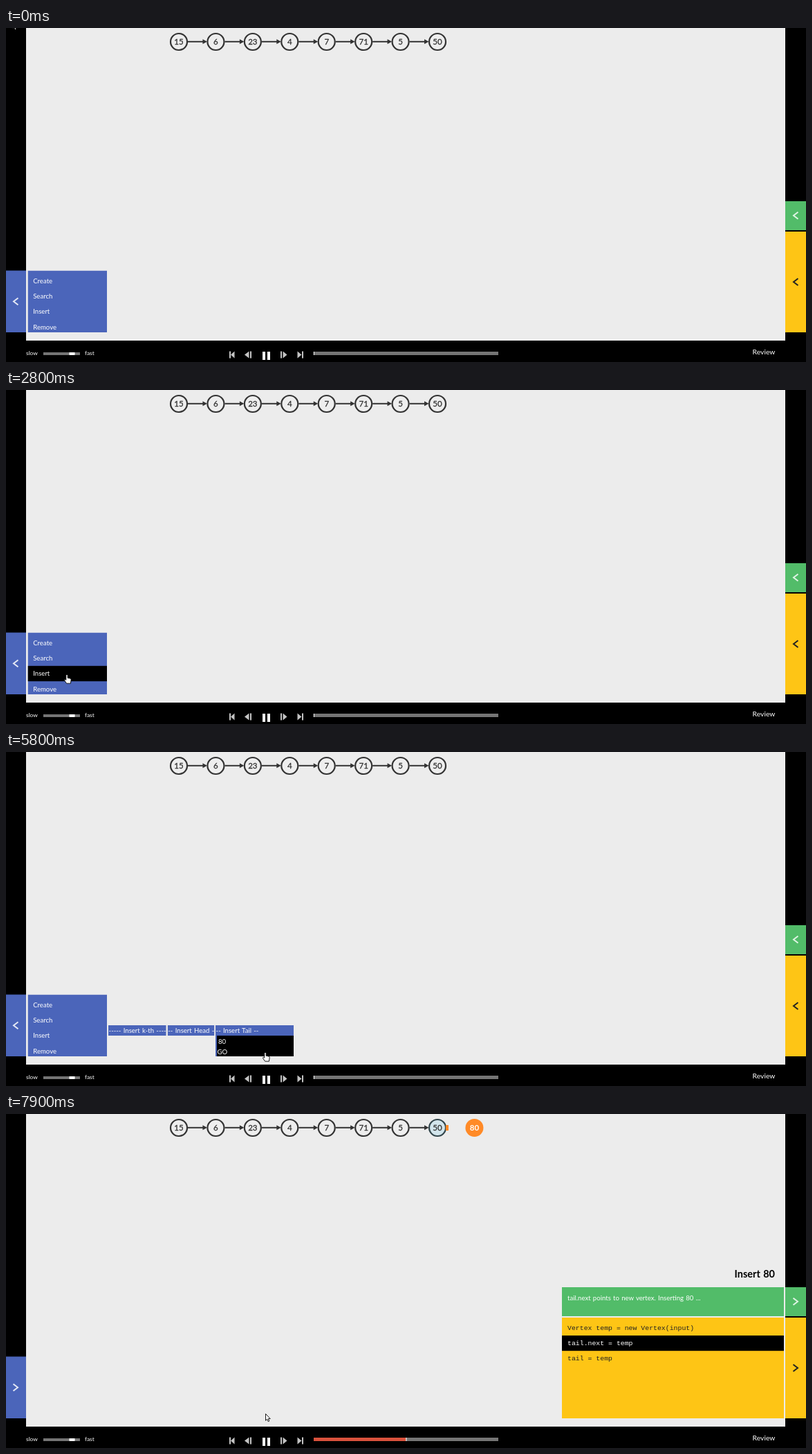
These frames come from a looping animation (1157x484 px, 8000 ms). An HTML page:

```html
<!DOCTYPE html>
<html lang="en">
<head>
<meta charset="utf-8">
<title>Linked list insertion</title>
<style>
  html, body { margin: 0; width: 100%; height: 100%; overflow: hidden; background: #000; }
  #stage { display: block; width: 1157px; height: 484px; }
  text { font: 9.6px Lato, "Open Sans", sans-serif; word-spacing: .8px; fill: #fff; }
  .code { font: 9.85px "Liberation Mono", monospace; word-spacing: 0; fill: #222; }
  .code.on { fill: #fff; }
  .small { font-size: 8.4px; }
  .review { font-size: 10.4px; }
  .title { font-size: 14.5px; font-weight: 700; fill: #000; }
  .node text { font-size: 11.5px; fill: #333; stroke: #333; stroke-width: .3; text-anchor: middle; }
  .node circle { fill: #eee; stroke: #333; stroke-width: 2.2; }
  .node.visited circle { fill: #d2e5ec; stroke: #33464c; }
  .node.fresh circle { fill: #ff8a27; stroke: none; }
  .node.fresh text { font-weight: 700; fill: #fff; stroke: none; }
  .chevron { fill: none; stroke-width: 2; }
  .blue { fill: #4b65ba; }
  .green { fill: #52bc69; }
  .gold { fill: #fec515; }
  .hover { fill: #000; }
  .bar { fill: #757575; }
  #cursor path { fill: #fff; stroke: #000; stroke-width: .9; stroke-linejoin: round; }
</style>
</head>
<body>
<svg id="stage" viewBox="0 0 1157 484">
  <rect width="1157" height="484"/>
  <rect x="29" width="1098" height="453" fill="#ececec"/>

  <g id="list"></g>
  <rect id="link" x="636" y="16" width="4" height="8" fill="#ff8a27"/>
  <g id="fresh" class="node fresh"><circle r="13"/><text y="4.1">80</text></g>

  <rect class="blue" y="351.5" width="29" height="89.5"/>
  <rect class="green" x="1127" y="251" width="30" height="42"/>
  <rect class="gold" x="1127" y="295" width="30" height="146"/>
  <g id="chevrons"></g>

  <svg id="menu" x="31.5" y="351.5" height="89.5">
    <rect class="blue" width="114.5" height="89.5"/>
    <rect id="menuHover" width="114.5"/>
  </svg>

  <g id="submenu">
    <g id="tabs"></g>
    <g id="form">
      <rect class="blue" x="303" y="411" width="113" height="30"/>
      <g id="fields">
        <rect x="305" y="411" width="111" height="16"/>
        <rect id="go" x="305" y="427" width="111" height="14"/>
        <text x="307" y="422.6">80</text>
        <text x="305.5" y="437.6">GO</text>
      </g>
    </g>
  </g>

  <text id="title" class="title" x="1112" y="237" text-anchor="end">Insert 80</text>
  <svg id="status" y="251" height="42">
    <rect class="green" width="321" height="42"/>
    <text id="message" x="8" y="18.7"></text>
  </svg>
  <svg id="trace" y="295" height="146">
    <rect class="gold" width="321" height="146"/>
    <rect id="band" width="321" height="22.2"/>
  </svg>

  <text class="small" x="29" y="474.3">slow</text>
  <text class="small" x="114" y="474.3">fast</text>
  <rect class="bar" x="54" y="470" width="53" height="4"/>
  <rect x="91.5" y="470" width="8" height="4" fill="#fff"/>
  <path fill="#c4c4c4" d="M323 468.5h2v10h-2zM330.5 468.5v10l-5.5-5z
    M351.5 468.5v10l-6.5-5zM353 468.5h2v10h-2z
    M397 468.5h2v10h-2zM400.5 468.5v10l6-5z
    M421.5 468.5v10l6-5zM428 468.5h2v10h-2z"/>
  <path fill="#fff" d="M371 469h4v12h-4zM378 469h4v12h-4z"/>
  <rect class="bar" x="445" y="469" width="267" height="5"/>
  <rect id="done" x="445" y="469" height="5" fill="#d9513c"/>
  <rect id="knob" y="469" width="1.2" height="5" fill="#eee"/>
  <text class="review" x="1079.5" y="473.4">Review</text>

  <g id="cursor">
    <path id="arrow" d="M.5 .5V10.2L2.7 8.2 4.2 11.6 5.8 10.9 4.3 7.6H7.2Z"/>
    <path id="hand" d="M-1.2 8.2V1.3Q-1.2 .4 0 .4T1.2 1.3V5.2L5 6Q6.3 6.4 6.2 7.8L5.4 13.2H-.4L-3.4 8.8Q-3.6 7.2-2.4 7.4Z"/>
  </g>
</svg>

<script>
const LOOP = 8000, STEP = 100;
const OPEN = 3300, EXPAND = 4900, RUN = 6800, CREATE = 7200, LINK = 7900;
const $ = id => document.getElementById(id);

function add(parent, tag, attrs, text) {
  const node = document.createElementNS("http://www.w3.org/2000/svg", tag);
  set(node, attrs);
  if (text) node.textContent = text;
  return parent.appendChild(node);
}
function set(node, attrs) {
  for (const key in attrs) node.setAttribute(key, attrs[key]);
}
const show = (node, on) => set(node, { visibility: on ? "visible" : "hidden" });
const clamp = v => Math.max(0, Math.min(1, v));
const swing = v => 0.5 - Math.cos(Math.PI * clamp(v)) / 2;

// Linked list
const nodeX = i => 250 + i * 53.43;
const nodes = [15, 6, 23, 4, 7, 71, 5, 50].map((value, i) => {
  const x = nodeX(i);
  if (i) {
    add($("list"), "path", { d: `M${nodeX(i - 1) + 13} 19.8H${x - 16}`, stroke: "#333", "stroke-width": 2 });
    add($("list"), "path", { d: `M${x - 19} 16.3L${x - 12.5} 19.8L${x - 19} 23.3Z`, fill: "#333" });
  }
  const g = add($("list"), "g", { class: "node", transform: `translate(${x} 20)` });
  add(g, "circle", { r: 12 });
  add(g, "text", { y: 4.1 }, String(value));
  return g;
});

// Tab arrows
const chevrons = [[14, 396.3, "#e4e8f5"], [1142, 271.8, "#e0f4e4"], [1142, 368, "#222"]].map(([x, y, stroke]) => {
  const g = add($("chevrons"), "g", {});
  add(g, "path", { class: "chevron", d: "M3.5 -5L-3 0L3.5 5", stroke });
  return { g, x, y };
});

// Menus
const rowY = [0, 26, 48.3, 70.6];
["Create", "Search", "Insert", "Remove"].forEach((label, i) =>
  add($("menu"), "text", { x: 7.7, y: 18.3 + i * 22.3 }, label));

const tabs = [
  ["----- Insert k-th -----", 148, 83.5],
  ["-- Insert Head --", 233.7, 67.5],
  ["-- Insert Tail --", 303, 60]
].map(([label, x, width]) => {
  const box = add($("tabs"), "svg", { x, width, height: 15 });
  const back = add(box, "rect", { width: 113, height: 15 });
  add(box, "text", { x: .6, y: 11 }, label);
  return { box, back };
});

// Pseudocode
const code = ["Vertex temp = new Vertex(input)", "tail.next = temp", "tail = temp"].map((line, i) =>
  add($("trace"), "text", { x: 8, y: 17.8 + i * 22.3 }, line));
const messages = [
  "The current LinkedList",
  "Create new vertex to store value 80.",
  "tail.next points to new vertex. Inserting 80 ..."
];

// Pointer path: time, x, y
const path = [
  [0, 9, -9], [200, 9, -9], [400, 64, 152], [900, 64, 152], [1100, 81, 246],
  [1700, 81, 246], [1900, 92, 341], [2000, 92, 341], [2300, 86, 377.5],
  [2800, 88, 412], [3200, 88, 412], [3600, 216, 401], [3900, 272, 404],
  [4000, 272, 404], [4100, 301, 406], [4200, 301, 406], [4400, 325, 406.5],
  [5000, 325, 406.5], [5700, 375, 434], [5800, 375, 435], [6700, 375, 435],
  [6800, 375, 434], [8000, 375, 434]
];
const hovers = [
  [0, ""], [2100, "create"], [2400, "search"], [2600, "insert"], [3400, ""], [3800, "head"],
  [4100, ""], [4300, "tail"], [5200, ""], [5500, "go"], [RUN, ""]
];

function pointer(t) {
  const i = path.findIndex(p => p[0] > t);
  const [a, b] = [path[i - 1], path[i]];
  const k = (t - a[0]) / (b[0] - a[0]);
  return [a[1] + (b[1] - a[1]) * k, a[2] + (b[2] - a[2]) * k];
}

function draw(t) {
  const hover = hovers.filter(h => h[0] <= t).pop()[1];
  const slide = t < RUN ? 0 : swing((t - 6690) / 400);
  const stage = t < CREATE ? 0 : t < LINK ? 1 : 2;

  const [x, y] = pointer(t);
  set($("cursor"), { transform: `translate(${x} ${y})` });
  show($("hand"), hover);
  show($("arrow"), !hover);

  set($("menu"), { width: 114.5 * (1 - slide) });
  show($("menu"), slide < 1);
  const row = ["create", "search", "insert"].indexOf(hover);
  show($("menuHover"), row >= 0 && slide < 1);
  if (row >= 0) set($("menuHover"), { y: rowY[row], height: rowY[row + 1] - rowY[row] });

  const expanded = t >= EXPAND;
  const fadeIn = t < OPEN ? 0 : clamp((t - OPEN + STEP) / 200);
  const fadeOut = t < RUN ? 1 : clamp(1 - (t - RUN + STEP) / 200);
  set($("submenu"), { opacity: fadeIn * fadeOut });
  tabs.forEach(({ box, back }, i) => {
    set(box, { y: expanded ? 396 : 402 });
    set(back, { class: hover === ["kth", "head", "tail"][i] ? "hover" : "blue" });
  });
  set(tabs[2].box, { width: expanded ? 113 : 60 });
  show($("form"), expanded);
  set($("fields"), { opacity: clamp((t - EXPAND) / 200) });
  set($("go"), { class: hover === "go" ? "hover" : "blue" });

  for (const { g, x, y } of chevrons) set(g, { transform: `translate(${x} ${y}) rotate(${180 * slide})` });
  const width = 321 * slide;
  for (const id of ["status", "trace"]) {
    set($(id), { x: 1125 - width, width });
    show($(id), slide > 0);
  }
  show($("title"), slide > 0);
  $("message").textContent = messages[stage];
  show($("band"), stage > 0);
  set($("band"), { y: 3.7 + (stage - 1) * 22.3 });
  code.forEach((line, i) => set(line, { class: i === stage - 1 ? "code on" : "code" }));

  const done = stage * 66.75;
  set($("done"), { width: done });
  set($("knob"), { x: 444.8 + done });

  const grow = clamp((t - 7250) / 500);
  set($("fresh"), { transform: `translate(${nodeX(8)} 20) scale(${grow})` });
  show($("fresh"), grow > 0);
  show($("link"), stage === 2);
  set(nodes[7], { class: stage === 2 ? "node visited" : "node" });
}

const start = performance.now();
function tick() {
  const t = (performance.now() - start) % LOOP;
  draw(Math.floor(t / STEP) * STEP);
  requestAnimationFrame(tick);
}
tick();
</script>
</body>
</html>
```
